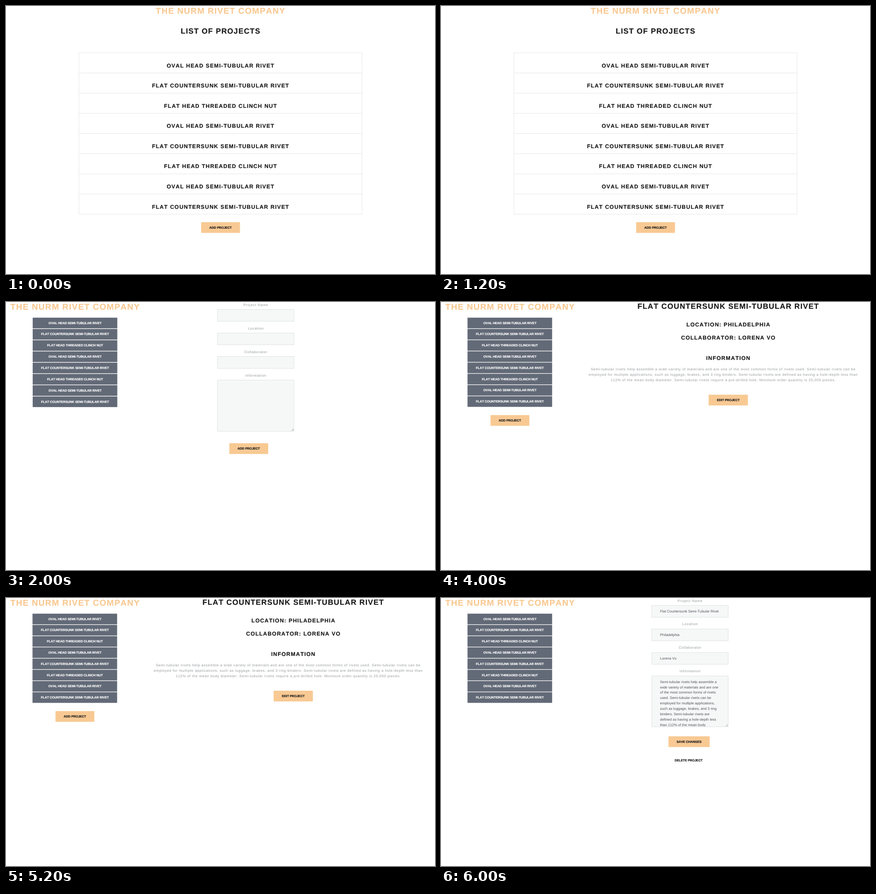
Recreate the animation shown at these times as an HTML page. Size 947 by 592 pixels, loop 8000 ms.

```html
<!DOCTYPE html>
<html lang="en">
<head>
<meta charset="utf-8">
<title>Rivet projects</title>
<style>
  html, body { margin: 0; width: 100%; height: 100%; overflow: hidden; background: #fff; }
  svg { display: block; width: 100vw; height: 100vh; }
  text {
    font-family: "Liberation Sans", Arial, Helvetica, sans-serif;
    font-kerning: none;
    text-rendering: geometricPrecision;
  }
</style>
</head>
<body>
<svg id="stage" viewBox="0 0 947 592"></svg>
<script>
const NS = "http://www.w3.org/2000/svg";
const stage = document.getElementById("stage");
const HOLD = 2000;

const INK = "#1a1a1c", PEACH = "#f8c993", SLATE = "#636a77", GREY = "#96989b";
const COMPANY = "THE NURM RIVET COMPANY";
const PERSON = "Lorena Vo";
const CITY = "Philadelphia";
const KINDS = [
  "Oval Head Semi-Tubular Rivet",
  "Flat Countersunk Semi-Tubular Rivet",
  "Flat Head Threaded Clinch Nut"
];
const projects = Array.from({ length: 8 }, (_, i) => KINDS[i % 3]);

function add(parent, tag, attrs, content) {
  const el = document.createElementNS(NS, tag);
  for (const key in attrs) el.setAttribute(key, attrs[key]);
  if (content) el.textContent = content;
  parent.appendChild(el);
  return el;
}

function rect(parent, x, y, width, height, fill, extra) {
  return add(parent, "rect", { x, y, width, height, fill, ...extra });
}

// Centred text is shifted by half the spacing that trails the last letter.
// Bold text gets a hairline stroke for heavier stems.
function label(parent, content, x, y, size, fill, { spacing = 0, weight = 700, anchor = "middle" } = {}) {
  return add(parent, "text", {
    x: anchor === "middle" ? x + spacing / 2 : x, y, fill,
    stroke: weight === 700 ? fill : "none", "stroke-width": 0.2,
    "font-size": size, "font-weight": weight,
    "letter-spacing": spacing, "text-anchor": anchor
  }, content);
}

function heading(parent, content, x, y, size, fill = INK) {
  label(parent, content.toUpperCase(), x, y, size, fill, { spacing: 1.16 });
}

function small(parent, content, x, y, fill = INK) {
  label(parent, content.toUpperCase(), x, y, 7.1, fill, { spacing: -0.12 });
}

function soft(parent, content, x, y) {
  label(parent, content, x, y, 7.9, GREY, { spacing: 0.62, weight: 400 });
}

function value(parent, content, x, y) {
  label(parent, content, x, y, 7.88, "#505459", { weight: 400, anchor: "start" });
}

function button(parent, content, x, y, width) {
  rect(parent, x, y, width, 23.7, PEACH, { rx: 0.6 });
  small(parent, content, x + width / 2, y + 14.4);
}

function title(parent, x) {
  heading(parent, COMPANY, x, 17, 18.8, PEACH);
}

function sidebar(parent, x, pitch) {
  title(parent, 152.2);
  projects.forEach((name, i) => {
    const y = 34.6 + i * pitch;
    rect(parent, x, y, 186.8, 23.5, SLATE);
    small(parent, name, x + 93.6, y + 14, "#fff");
  });
}

function form(parent, x, width, pitch, areaHeight) {
  const box = { stroke: "#d8dcdd", "stroke-width": 0.8 };
  ["Project Name", "Location", "Collaborator", "Information"].forEach((name, i) => {
    soft(parent, name, x + width / 2, 8.6 + i * pitch);
    rect(parent, x, 16.6 + i * pitch, width, i < 3 ? 26 : areaHeight, "#f6f8f8", box);
  });
  const right = x + width - 1, bottom = 16.6 + 3 * pitch + areaHeight - 1;
  add(parent, "path", {
    d: `M${right - 4.5} ${bottom}l4.5 -4.5M${right - 2} ${bottom}l2 -2`,
    stroke: "#888", "stroke-width": 0.8
  });
}

function drawList(g) {
  const pitch = 44.57, top = 103.4;
  title(g, 473.2);
  heading(g, "List of projects", 473.2, 61.2, 16.6);
  rect(g, 161, top, 625, pitch * 8, "none", { stroke: "#e5e5e5", "stroke-width": 0.9 });
  projects.forEach((name, i) => {
    const y = top + i * pitch;
    if (i) add(g, "path", { d: `M161 ${y}h625`, stroke: "#e4e4e4", "stroke-width": 0.9 });
    heading(g, name, 473.2, y + 32.2, 12.1);
  });
  button(g, "Add project", 430.8, 477.6, 85.7);
}

function drawAdd(g) {
  sidebar(g, 58.9, 24.86);
  form(g, 466.7, 169, 52, 112.8);
  button(g, "Add project", 493, 312, 85.8);
}

function drawDetail(g) {
  sidebar(g, 58.5, 24.79);
  button(g, "Add project", 109.3, 249.8, 85.7);
  heading(g, KINDS[1], 633.7, 14.8, 16.6);
  heading(g, "Location: " + CITY, 634, 53.7, 12.1);
  heading(g, "Collaborator: " + PERSON, 633.8, 83, 12.1);
  heading(g, "Information", 633.8, 128.3, 12.1);
  [
    "Semi-tubular rivets help assemble a wide variety of materials and are one of the most common forms of rivets used. Semi-tubular rivets can be",
    "employed for multiple applications, such as luggage, brakes, and 3 ring binders. Semi-tubular rivets are defined as having a hole-depth less than",
    "112% of the mean body diameter. Semi-tubular rivets require a pre-drilled hole. Minimum order quantity is 25,000 pieces."
  ].forEach((line, i) => soft(g, line, 622.7, 151 + i * 11.87));
  button(g, "Edit project", 590.8, 204.8, 86.6);
}

function drawEdit(g) {
  sidebar(g, 58.5, 24.79);
  form(g, 465.2, 168.8, 51.85, 112.4);
  [KINDS[1], CITY, PERSON].forEach((entry, i) => value(g, entry, 483.5, 32.2 + i * 51.85));
  const clip = add(g, "clipPath", { id: "area" });
  rect(clip, 465.6, 172.5, 168, 111.5, "#000");
  const lines = add(g, "g", { "clip-path": "url(#area)" });
  [
    "Semi-tubular rivets help assemble a",
    "wide variety of materials and are one",
    "of the most common forms of rivets",
    "used. Semi-tubular rivets can be",
    "employed for multiple applications,",
    "such as luggage, brakes, and 3 ring",
    "binders. Semi-tubular rivets are",
    "defined as having a hole-depth less",
    "than 112% of the mean body"
  ].forEach((line, i) => value(lines, line, 483.5, 187.7 + i * 11.85));
  button(g, "Save changes", 502.2, 305.6, 90.8);
  small(g, "Delete project", 546.6, 361.4);
}

const screens = [drawList, drawAdd, drawDetail, drawEdit].map(draw => {
  const g = add(stage, "g", {});
  draw(g);
  return g;
});

function render(ms) {
  const current = Math.floor(ms / HOLD) % screens.length;
  screens.forEach((g, i) => g.setAttribute("display", i === current ? "inline" : "none"));
}

const start = performance.now();
function tick() {
  render(performance.now() - start);
  requestAnimationFrame(tick);
}
render(0);
requestAnimationFrame(tick);
</script>
</body>
</html>
```
